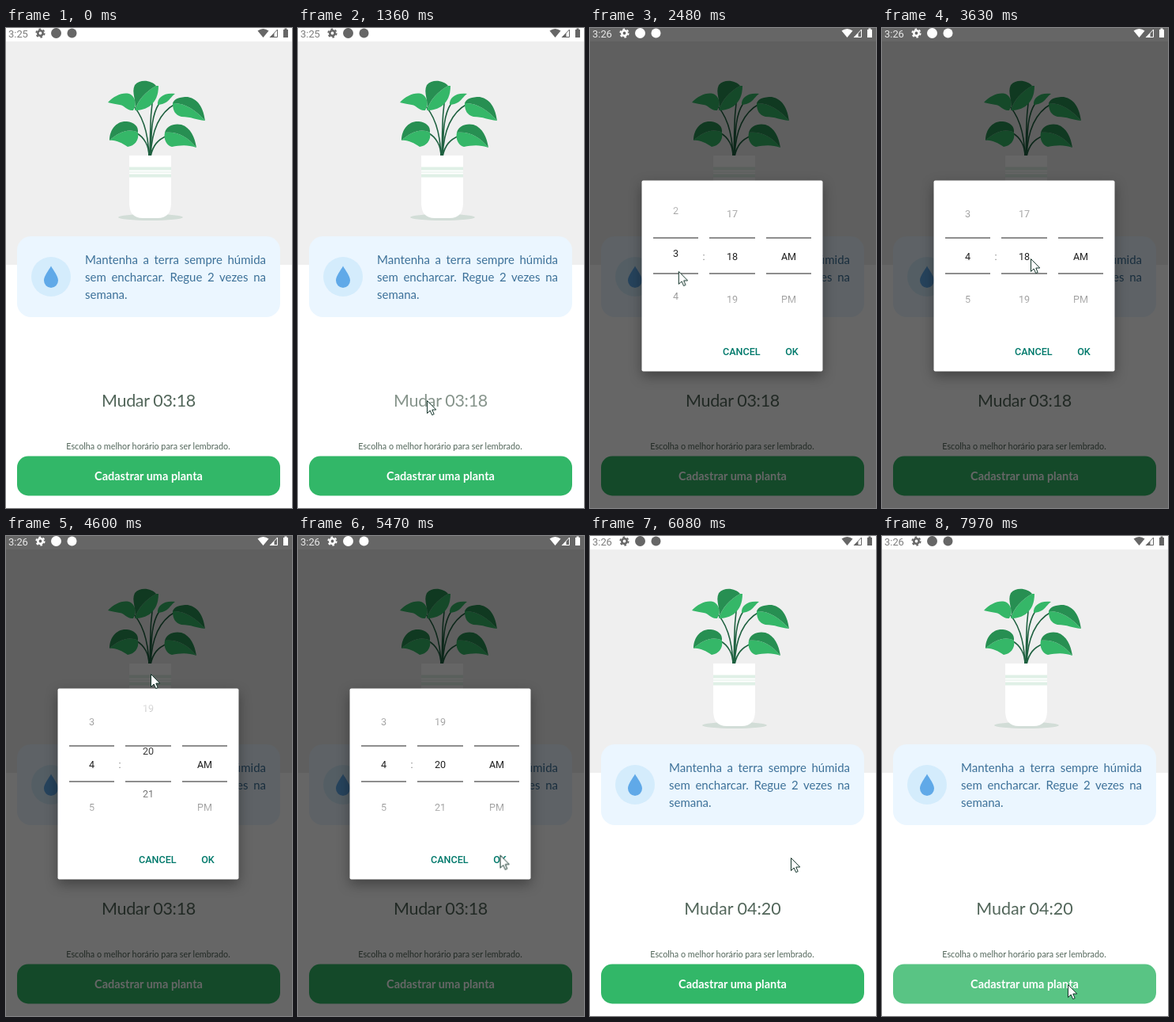
Write an HTML page that moves like this. It is 362 px wide and 606 px high and loops after 8 s.

```html
<!DOCTYPE html>
<html lang="pt-BR">
<head>
<meta charset="utf-8">
<title>Lembrete da planta</title>
<style>
  html, body { margin: 0; width: 100%; height: 100%; overflow: hidden; background: #fff; }
  svg { display: block; }
  text, p { font-family: Lato, "Open Sans", sans-serif; }

  /* every moving part shares one 8 s clock */
  .anim { animation: 8s linear infinite; }
  .step { animation: 8s step-end infinite; }

  .light { fill: #35b768; }
  .dark { fill: #278f52; }
  .stems { fill: none; stroke: #1f6140; stroke-width: 1.6; }
  .tip { margin: 0; font-size: 15px; line-height: 22px; color: #3d7199; text-align-last: justify; }
  .tip:last-child { text-align-last: left; }
  .heading { fill: #52665a; text-anchor: middle; }
  .time { font-size: 21.5px; }
  .note { font-size: 10.8px; }
  .action { font-size: 14.5px; font-weight: 700; fill: #fff; text-anchor: middle; }

  .status text { font: 13px Roboto, sans-serif; fill-opacity: .85; }
  .status { fill: currentColor; animation-name: status; }
  .dialog text { font: 12.6px Roboto, sans-serif; fill: #212121; text-anchor: middle; }
  .dialog .choice { font-weight: 500; fill: #00796b; }
  .panel { fill: #fff; filter: drop-shadow(0 6px 8px rgba(0, 0, 0, .35)); }

  .before { animation-name: before; }
  .after { animation-name: after; }
  .five { animation-name: five; }
  .six { animation-name: six; }
  .button { animation-name: press; }
  .dim { animation-name: dim; }
  .dialog { animation-name: dialog; }
  .hours { animation-name: hours; }
  .minutes { animation-name: minutes; }
  .cursor { animation-name: cursor; }

  @keyframes before {
    0% { opacity: 1 }
    16.9% { opacity: .7 }
    19.2% { opacity: 1 }
    75.9%, 100% { opacity: 0 }
  }
  @keyframes after { 0% { opacity: 0 } 75.9%, 100% { opacity: 1 } }
  @keyframes five { 0% { opacity: 1 } 26%, 100% { opacity: 0 } }
  @keyframes six { 0% { opacity: 0 } 26%, 100% { opacity: 1 } }
  @keyframes press {
    0% { opacity: 1 }
    97.3% { opacity: .95 }
    98.1% { opacity: .9 }
    98.8% { opacity: .85 }
    99.6%, 100% { opacity: .81 }
  }
  @keyframes status {
    0% { color: #666; opacity: 1 }
    19.8% { color: #fff; opacity: 1 }
    74.7% { color: #666; opacity: 0 }
    75.3% { color: #666; opacity: .4 }
    75.9%, 100% { color: #666; opacity: 1 }
  }
  @keyframes dim {
    0% { opacity: 0 }
    19.2% { opacity: .25 }
    19.8% { opacity: .58 }
    20.4% { opacity: .84 }
    21.1% { opacity: 1 }
    74.7% { opacity: .62 }
    75.3% { opacity: .2 }
    75.9%, 100% { opacity: 0 }
  }
  @keyframes dialog {
    0% { opacity: 0 }
    19.2% { opacity: .3 }
    19.8% { opacity: .75 }
    20.4% { opacity: .97 }
    21.1% { opacity: 1 }
    74.7% { opacity: .45 }
    75.3% { opacity: .14 }
    75.9%, 100% { opacity: 0 }
  }
  @keyframes hours {
    0%, 30.7% { transform: translateY(0) }
    35% { transform: translateY(-46px); animation-timing-function: ease-out }
    39.6%, 100% { transform: translateY(-54px) }
  }
  @keyframes minutes {
    0%, 47.4% { transform: translateY(0) }
    50.5% { transform: translateY(-62px) }
    54.6%, 57.2% { transform: translateY(-128px) }
    57.5% { transform: translateY(-125px); animation-timing-function: ease-out }
    66%, 100% { transform: translateY(-108px) }
  }
  @keyframes cursor {
    0%, 1.8% { transform: translate(250px, 620px) }
    2% { transform: translate(255px, 578px) }
    4% { transform: translate(285px, 478px) }
    5.5%, 7.3% { transform: translate(282px, 435px) }
    13.5%, 24.6% { transform: translate(163px, 470px) }
    28.5%, 30% { transform: translate(112px, 318px) }
    35% { transform: translate(111px, 263px) }
    39.6% { transform: translate(112px, 258px) }
    43% { transform: translate(197px, 296px) }
    45.3%, 45.6% { transform: translate(188px, 291px) }
    47% { transform: translate(184px, 310px) }
    50.5% { transform: translate(184px, 240px) }
    54.6%, 58.2% { transform: translate(183px, 174px) }
    64% { transform: translate(262px, 350px) }
    67.4% { transform: translate(258px, 397px) }
    69%, 81.3% { transform: translate(254px, 406px); animation-timing-function: ease-in-out }
    88.7%, 100% { transform: translate(235px, 566px) }
  }
</style>
</head>
<body>
<svg width="362" height="606" viewBox="0 0 362 606">
  <defs>
    <linearGradient id="fade" gradientUnits="userSpaceOnUse" x1="0" y1="202" x2="0" y2="374">
      <stop offset="0" stop-color="#fff" stop-opacity="0"/>
      <stop offset=".465" stop-color="#fff"/>
      <stop offset=".535" stop-color="#fff"/>
      <stop offset="1" stop-color="#fff" stop-opacity="0"/>
    </linearGradient>
    <mask id="wheel" maskUnits="userSpaceOnUse" x="65" y="202" width="230" height="172">
      <rect x="65" y="202" width="230" height="172" fill="url(#fade)"/>
    </mask>
  </defs>

  <rect width="362" height="606" fill="#fff"/>
  <rect y="17" width="362" height="282" fill="#efefef"/>

  <!-- plant -->
  <ellipse cx="183" cy="239" rx="41" ry="4" fill="#d2ddd7"/>
  <g class="stems">
    <path d="M181 162C180 130 172 108 158 95M182 162C183 130 182 105 188 77M183 162C184 130 184 110 194 95"/>
    <path d="M183 162C184 135 192 108 214 96M181 162C181 150 176 138 164 132M183 162C186 148 192 141 204 136"/>
  </g>
  <g class="light">
    <path d="M129 94C137 85 150 80 158 84C165 89 165 98 161 104C153 105 151 98 144 97C138 96 133 95 129 94Z"/>
    <path d="M190 73C177 80 167 91 163 104C177 104 193 97 193 73Z"/>
    <path d="M192 97C191 88 200 81 214 83C207 88 206 96 192 97Z"/>
    <path d="M252 117C240 103 225 94 211 95C211 104 214 110 222 112C235 112 240 116 252 117Z"/>
    <path d="M131 142C142 132 155 126 167 132C169 142 162 149 154 150C146 145 139 141 131 142Z"/>
    <path d="M241 151C230 137 216 130 201 132C199 141 204 149 210 150C220 148 230 147 241 151Z"/>
  </g>
  <g class="dark">
    <path d="M190 73C184 66 170 64 163 72C158 82 166 92 163 104C167 91 177 80 190 73Z"/>
    <path d="M252 117C250 103 245 90 230 87C220 87 213 89 211 95C225 94 240 103 252 117Z"/>
    <path d="M131 142C131 128 140 117 153 118C162 119 168 124 167 132C155 126 142 132 131 142Z"/>
    <path d="M241 151C239 138 234 126 222 122C212 120 203 124 201 132C216 130 230 137 241 151Z"/>
  </g>
  <path d="M156 161h53v60q0 19-17 19h-19q-17 0-17-19Z" fill="#fff"/>
  <path d="M156 175.500h53v4h-53zM156 181.500h53v1h-53zM156 184.500h53v4h-53z" fill="#dff0e6"/>

  <!-- watering tip -->
  <rect x="14" y="263" width="333" height="102" rx="17.600" fill="#ebf6ff"/>
  <circle cx="57" cy="314" r="25" fill="#d4ecfc"/>
  <path d="M57 300.500C60 306 66 313 66 318.700A9 9.200 0 0 1 48 318.700C48 313 54 306 57 300.500Z" fill="#60a9e8"/>
  <foreignObject x="100" y="281" width="229" height="70">
    <p class="tip">Mantenha a terra sempre húmida</p>
    <p class="tip">sem encharcar. Regue 2 vezes na</p>
    <p class="tip">semana.</p>
  </foreignObject>

  <text class="heading time step before" x="180.500" y="477.500" letter-spacing="-.35">Mudar 03:18</text>
  <text class="heading time step after" x="180.500" y="477.500">Mudar 04:20</text>
  <text class="heading note" x="180" y="532">Escolha o melhor horário para ser lembrado.</text>
  <g class="step button">
    <rect x="14" y="540.600" width="333" height="49.900" rx="14.100" fill="#32b768"/>
    <text class="action" x="180.500" y="571">Cadastrar uma planta</text>
  </g>

  <rect class="step dim" width="362" height="606" fill-opacity=".6"/>

  <g class="step status">
    <text x="3" y="11.500">3:2</text>
    <text class="step five" x="20.500" y="11.500">5</text>
    <text class="step six" x="20.500" y="11.500">6</text>
    <circle cx="43.500" cy="6.500" r="3.200" fill="none" stroke="currentColor" stroke-width="2.600"/>
    <circle cx="43.500" cy="6.500" r="5.200" fill="none" stroke="currentColor" stroke-width="1.800" stroke-dasharray="2.700 2.745"/>
    <circle cx="63.500" cy="6.500" r="6.500"/>
    <circle cx="83.500" cy="6.500" r="6"/>
    <path d="M318.500 3.500Q325.500-1.500 332.500 3.500L325.500 12Z"/>
    <path d="M343.500 2V11.500H334.500Z" fill="none" stroke="currentColor"/>
    <path d="M339.500 6.500V12H333.500Z"/>
    <path d="M351 2h1.500v-1.500h3v1.500h1.500v10h-6z"/>
  </g>

  <!-- time picker -->
  <g class="step dialog">
    <rect class="panel" x="65.500" y="192.500" width="229" height="241" rx="2"/>
    <g mask="url(#wheel)">
      <g class="anim hours">
        <text x="108.500" y="238.500">2</text>
        <text x="108.500" y="292.500">3</text>
        <text x="108.500" y="346.500">4</text>
        <text x="108.500" y="400.500">5</text>
      </g>
    </g>
    <g mask="url(#wheel)">
      <g class="anim minutes">
        <text x="180" y="238.500">17</text>
        <text x="180" y="292.500">18</text>
        <text x="180" y="346.500">19</text>
        <text x="180" y="400.500">20</text>
        <text x="180" y="454.500">21</text>
        <text x="180" y="508.500">22</text>
      </g>
    </g>
    <g mask="url(#wheel)">
      <text x="251.500" y="292.500">AM</text>
      <text x="251.500" y="346.500">PM</text>
    </g>
    <text x="144" y="292.500" fill-opacity=".6">:</text>
    <path d="M80 265h57M151 265h58M223 265h57M80 310h57M151 310h58M223 310h57" stroke="#6a6a6a" stroke-width="1.400"/>
    <text class="choice" x="191.800" y="413">CANCEL</text>
    <text class="choice" x="255.500" y="413">OK</text>
  </g>

  <path class="anim cursor" d="M.5.5V16.500L4.200 13L6.700 18.600L9.200 17.500L6.800 12H11.800Z" fill="#fff" stroke="#12342a"/>
</svg>
</body>
</html>
```
